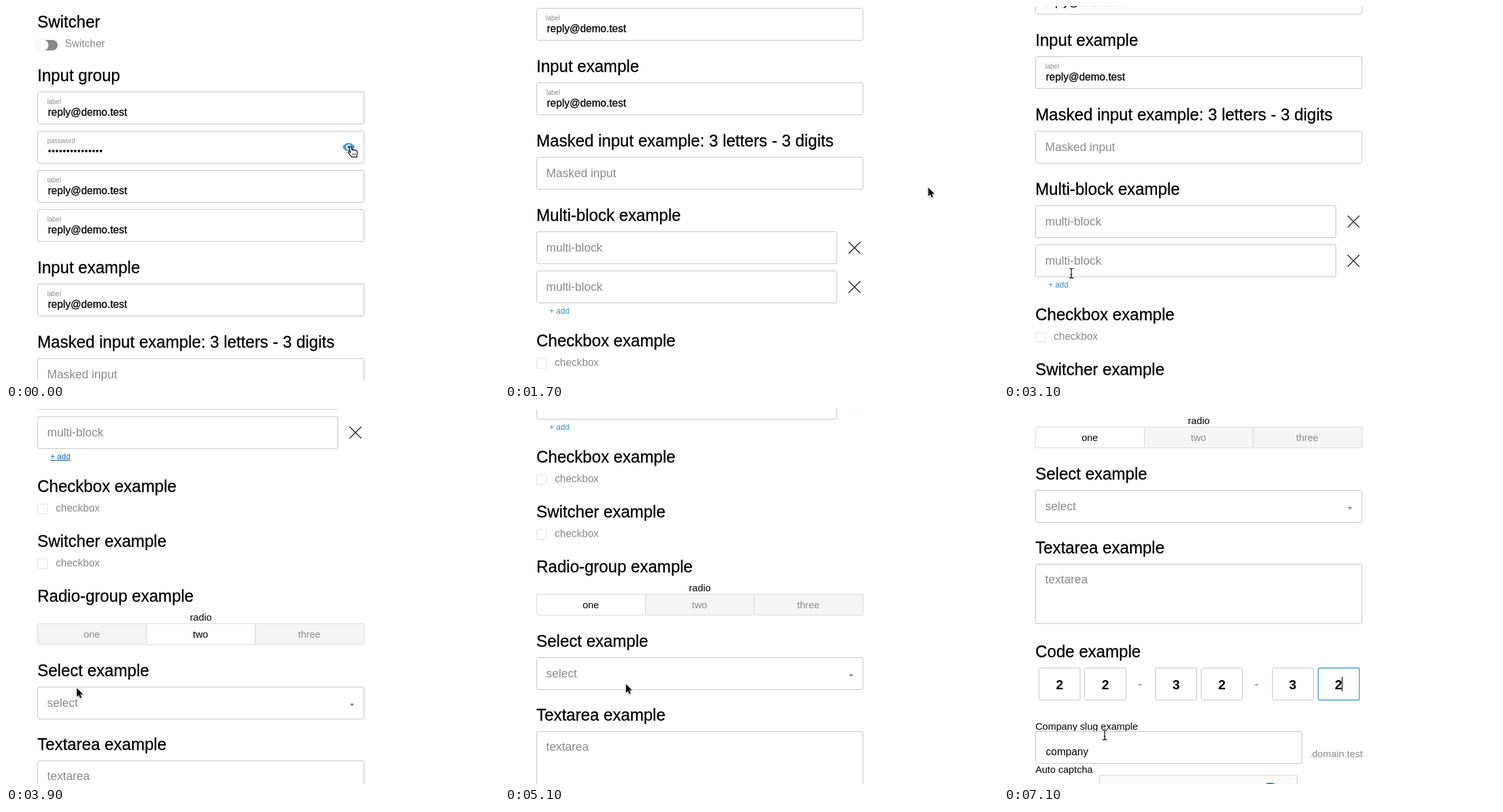
An HTML page that plays this animation: 754 by 574 pixels, repeating every 7200 ms.

```html
<!DOCTYPE html>
<html lang="en">
<head>
<meta charset="utf-8">
<title>Form elements</title>
<style>
html, body { margin: 0; width: 100%; height: 100%; overflow: hidden; background: #fff; }
svg { display: block; font-family: "Liberation Sans", Arial, sans-serif; }
.dark { stroke: #000; stroke-width: .3; }
</style>
</head>
<body>
<svg id="stage" width="754" height="574" viewBox="0 0 754 574"></svg>
<script>
const LOOP = 7200, STEP = 100;
const GREY = '#8a8a8a', LINE = '#c5c5c5', SOFT = '#d9d9d9', BLUE = '#3d9ad6';
const stage = document.getElementById('stage');

// start, end, distance
const scrolls = [[1300, 1800, 344], [2100, 2700, 4], [3500, 4000, 395], [4300, 4400, 4], [5100, 5300, 256]];

// start, end, x, y, pointer on arrival
const moves = [
  [0, 0, 526, 215, 'hand'], [800, 1200, 603, 214, 'arrow'], [1200, 1800, 651, 283, 'arrow'],
  [2500, 3100, 103, 409, 'beam'], [3100, 3400, 84, 424, 'hand'], [3800, 4100, 178, 437, 'arrow'],
  [4200, 4500, 134, 304, 'hand'], [4800, 5100, 185, 421, 'arrow'], [5400, 5700, 90, 422, 'beam'],
  [6500, 7100, 154, 499, 'beam']
];

function ease(t, a, b) {
  const p = b > a ? Math.min(1, Math.max(0, (t - a) / (b - a))) : 1;
  return p * p * (3 - 2 * p);
}

const scrollAt = t => Math.round(scrolls.reduce((sum, [a, b, d]) => sum + d * ease(t, a, b), 0));

function mouseAt(t) {
  let x = 0, y = 0, shape;
  for (const [a, b, toX, toY, arrived] of moves) {
    if (a > 0 && t <= a) break;
    const p = ease(t, a, b);
    x += (toX - x) * p;
    y += (toY - y) * p;
    shape = p < 1 ? 'arrow' : arrived;
  }
  return { x, y, shape };
}

const text = (x, y, s, size = 16, fill = '#000', more = '') =>
  `<text x="${x}" y="${y}" font-size="${size}" fill="${fill}" ${more}>${s}</text>`;
const mid = (x, y, s, size, fill, more = '') => text(x, y, s, size, fill, 'text-anchor="middle" ' + more);
const box = (x, y, w, h, stroke = LINE, fill = '#fff') =>
  `<rect x="${x + .5}" y="${y + .5}" width="${w - 1}" height="${h - 1}" rx="2.5" fill="${fill}" ` +
  `stroke="${stroke}" stroke-width="${stroke === BLUE ? 1.3 : 1}"/>`;
const path = (d, more) => `<path d="${d}" ${more}/>`;
const caret = (x, y, h) => `<rect x="${x}" y="${y}" width="1.2" height="${h}"/>`;
const shift = (x, y, s) => `<g transform="translate(${x} ${y})">${s}</g>`;

// Controls, each drawn from its own top
const labelled = (label, stroke) => box(48, 0, 500, 50, stroke) + text(63, 19, label, 10, GREY);
const mail = labelled('label') + text(64, 37, 'reply@demo.test', 16, '#000', 'class="dark"');
const empty = (s, w = 500, h = 50) => box(48, 0, w, h) + text(63, 31, s, 18, GREY);
const multi = empty('multi-block', 460) + path('M525.5 16l18 18m0 -18l-18 18', 'stroke="#111" stroke-width="1.2"');
const check = box(48, 2, 16, 16, '#e2e2e2') + text(76, 14, 'checkbox', 16, GREY);
const toggle = '<rect x="49" y="3" width="30" height="16" rx="8" fill="#888"/>' +
  '<circle cx="56" cy="11" r="9" fill="#fff" style="filter:drop-shadow(0 0 1px #0004)"/>' +
  text(90, 14, 'Switcher', 16, GREY);
const select = empty('select') + path('M526 26h6.4l-3.2 4.2z', `fill="${GREY}"`);
const eye = `<g transform="translate(524 25) scale(.82)" fill="${BLUE}">` +
  path('M-11 0C-7.5-10 7.5-10 11 0C7.5 10-7.5 10-11 0ZM0-5A5 5 0 1 0 0 5 5 5 0 1 0 0-5Z', 'fill-rule="evenodd"') +
  '<circle r="3"/></g>';

function password(t) {
  const focus = t >= 600 && t < 4600, blink = (t + 800) % 1000 < 500;
  return labelled('password', focus ? BLUE : LINE) + eye +
    text(64.3, 36, '•'.repeat(15), 14, '#000', 'letter-spacing=".7"') +
    (focus && blink ? caret(148.2, 23, 18) : '');
}

function addLink(t) {
  const hover = t >= 3400 && t < 4200;
  return text(68, 16, '+ add', 12, hover ? '#0b66b8' : '#2f8fd3', hover ? 'text-decoration="underline"' : '');
}

function radio(t) {
  const chosen = t < 4600 ? 1 : 0, w = 166.33;
  return mid(298, 13, 'radio', 15) + ['one', 'two', 'three'].map((s, i) => {
    const on = i === chosen, x = 48 + i * w;
    return box(x, 17, w + 1, 33, SOFT, on ? '#fff' : '#f5f5f5') + mid(x + w / 2, 38.5, s, 15, on ? '#000' : GREY);
  }).join('');
}

function code(t) {
  const typed = Math.min(6, Math.max(0, Math.floor((t - 6100) / 180) + 1));
  const focus = t >= 5800 ? Math.min(typed, 5) : -1;
  return [...'223232'].map((n, i) => {
    const x = 85 + Math.floor(i / 2) * 178.3 + i % 2 * 70, filled = i < typed;
    return box(Math.round(x - 32), 0, 64, 50, i === focus ? BLUE : LINE) +
      (filled ? mid(x, 32.5, n, 20, '#000', 'font-weight="700"') : '') +
      (i === focus ? caret(filled ? x + 5 : x, 14, 22) : '');
  }).join('') + mid(208, 32, '-', 20, GREY) + mid(386, 32, '-', 20, GREY);
}

const footer = text(48, -2.5, 'Company slug example', 15) + box(48, 0, 408, 50) + text(64, 37, 'company') +
  text(467, 40, '.domain.test', 15, GREY) + text(48, 64, 'Auto captcha', 15) +
  box(146, 67, 303, 76, '#d3d3d3', '#f9f9f9') + '<circle cx="407" cy="95" r="16" fill="#3a6cc6"/>';

function page(t) {
  let y = 33, out = '';
  const put = (s, height) => { out += shift(0, Math.round(y), s); y += height; };
  // Each control is a pair: drawing, height
  const section = (title, ...controls) => {
    put(text(48, 0, title, 25, '#000', 'class="dark"'), 16);
    controls.forEach(c => put(...c));
    y += 47.75;
  };
  section('Switcher', [toggle, 18.5]);
  section('Input group', [mail, 60], [password(t), 60], [mail, 60], [mail, 50]);
  section('Input example', [mail, 50]);
  section('Masked input example: 3 letters - 3 digits', [empty('Masked input'), 50]);
  section('Multi-block example', [multi, 60], [multi, 50], [addLink(t), 19]);
  section('Checkbox example', [check, 20]);
  section('Switcher example', [check, 20]);
  section('Radio-group example', [radio(t), 50]);
  section('Select example', [select, 50]);
  section('Textarea example', [box(48, 0, 500, 92) + text(63, 30, 'textarea', 18, GREY), 95]);
  section('Code example', [code(t), 49]);
  put(footer, 0);
  return out;
}

// Pointers, each drawn from its hot spot
const pointers = {
  arrow: path('M0 0V13.2L3 10.4 5 15.2 7.3 14.2 5.3 9.5H9.3Z',
    'stroke="#fff" stroke-width="1.6" paint-order="stroke" style="filter:drop-shadow(0 1px 1px #0005)"'),
  hand: path('M-1 1C-1-.8 1.3-.9 1.8.8L3.4 6C3.2 4.6 5.4 4.4 5.8 5.8 6.2 4.6 8 4.8 8.3 6.2 9 5.3 10.7 5.8 11 7.3 ' +
    '11.6 9.6 11.4 11.8 10.6 13.4L10.6 16.2H2.8C1.6 13.8-.8 12-2.4 9.8-3.2 8.3-1.5 7.5-.2 8.6L.8 9.4Z',
    'fill="#fff" stroke="#000" stroke-width="1.2" stroke-linejoin="round"') +
    path('M4.4 10.5V13.5M6.4 10.5V13.5M8.4 10.5V13.5', 'stroke="#000" stroke-width=".8"'),
  beam: ['stroke="#fff" stroke-width="2.6"', 'stroke="#000" stroke-width="1.2"'].map(s =>
    path('M-3.5-7.5Q0-7.5 0-5.5Q0-7.5 3.5-7.5M0-5.5V5.5M-3.5 7.5Q0 7.5 0 5.5Q0 7.5 3.5 7.5M-1.5 2H1.5',
      'fill="none" ' + s)).join('')
};

function draw(t) {
  const { x, y, shape } = mouseAt(t);
  stage.innerHTML = shift(0, -scrollAt(t), page(t)) + shift(x, y, pointers[shape]);
}

let last = -1;
const start = performance.now();
function tick() {
  const t = Math.floor((performance.now() - start) % LOOP / STEP) * STEP;
  if (t !== last) draw(last = t);
  requestAnimationFrame(tick);
}
tick();
</script>
</body>
</html>
```
